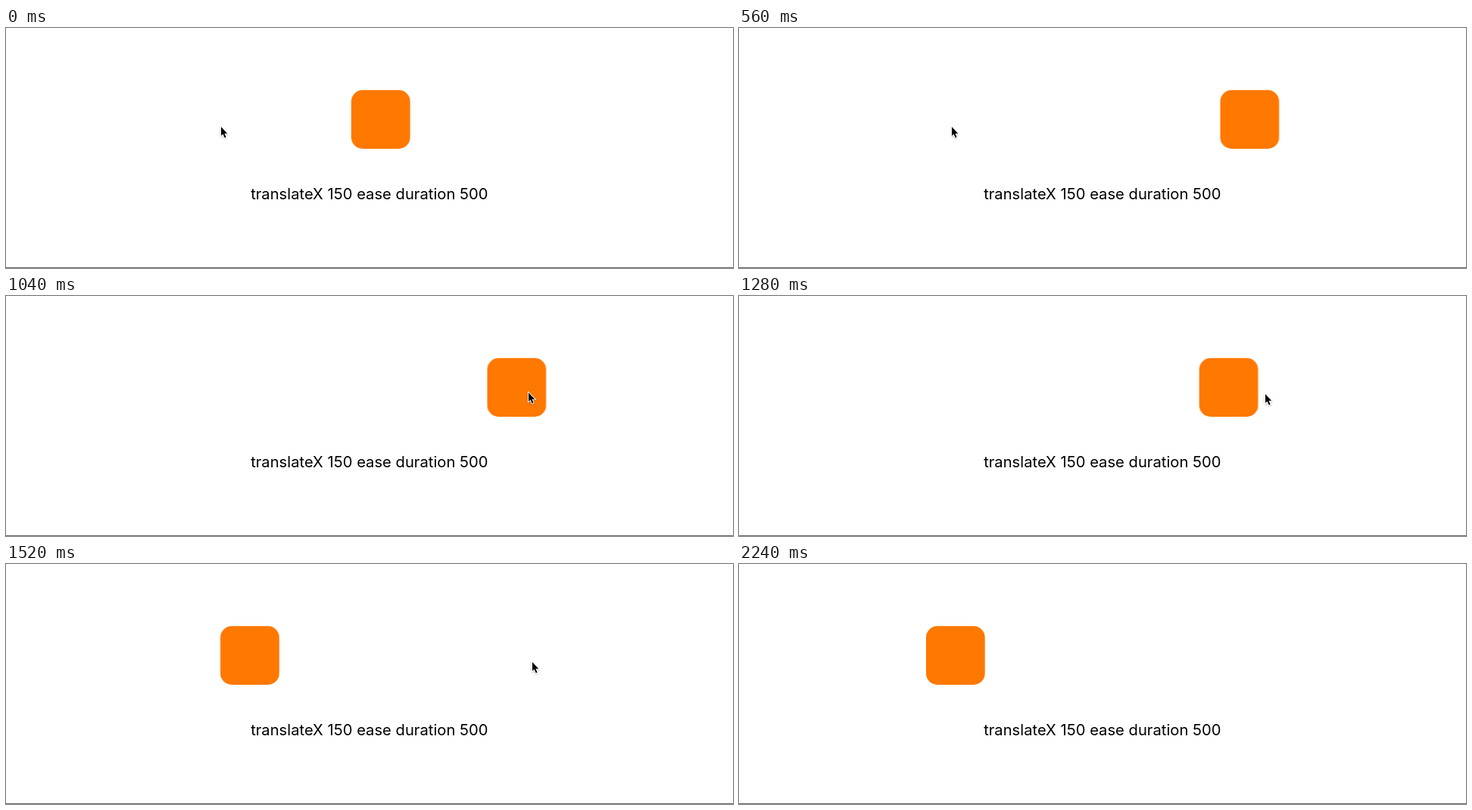
An HTML page that plays this animation: 960x318 px, repeating every 2280 ms.

```html
<!DOCTYPE html>
<html lang="en">
<head>
<meta charset="utf-8">
<title>translateX ease</title>
<style>
  html, body {
    margin: 0;
    width: 100%;
    height: 100%;
    overflow: hidden;
    background: #fff;
  }
  svg {
    display: block;
    width: 960px;
    height: 318px;
  }
  text {
    font: 20.2px Montserrat, Inter, sans-serif;
    text-anchor: middle;
  }
  .box, .cursor {
    animation: 2280ms linear infinite;
  }
  .box {
    fill: #ff7800;
    animation-name: slide;
  }
  .cursor {
    animation-name: point, leave;
    animation-timing-function: linear, step-end;
  }

  /* The loop opens halfway along an ease curve, so its second half is used. */
  @keyframes slide {
    0% {
      transform: translateX(207.4px);
      animation-timing-function: cubic-bezier(.1818, .5135, .4545, 1);
    }
    15.08% { transform: translateX(388.5px); }
    54.58% {
      transform: translateX(388.5px);
      animation-timing-function: ease;
    }
    73.7%, 100% { transform: translateX(0); }
  }
  @keyframes point {
    0%, 21.05% { transform: translate(284px, 131px); }
    24.56%, 27.19% {
      transform: translate(281px, 131px);
      animation-timing-function: ease-in-out;
    }
    43.86%, 47.37% { transform: translate(690px, 128px); }
    52.63%, 68.42% {
      transform: translate(695px, 130px);
      animation-timing-function: ease-in;
    }
    71.93%, 100% { transform: translate(698px, 56px); }
  }
  @keyframes leave {
    0% { opacity: 1; }
    72.8%, 100% { opacity: 0; }
  }
</style>
</head>
<body>
<svg viewBox="0 0 960 318">
  <defs>
    <filter id="shade" x="-50%" y="-50%" width="200%" height="200%">
      <feDropShadow dx="0" dy="1" stdDeviation="1" flood-opacity=".3"/>
    </filter>
  </defs>
  <rect class="box" x="247" y="82.3" width="77.7" height="77.7" rx="15"/>
  <text x="479.8" y="227">translateX 150 ease duration 500</text>
  <rect y="317" width="960" height="1" fill="#6b676b"/>
  <g class="cursor">
    <path d="M0 0V11.8L2.6 9.4L4.7 14.4L6.6 13.6L4.5 8.7H8.3Z"
          stroke="#fff" stroke-width="1.8" paint-order="stroke" filter="url(#shade)"/>
  </g>
</svg>
</body>
</html>
```
